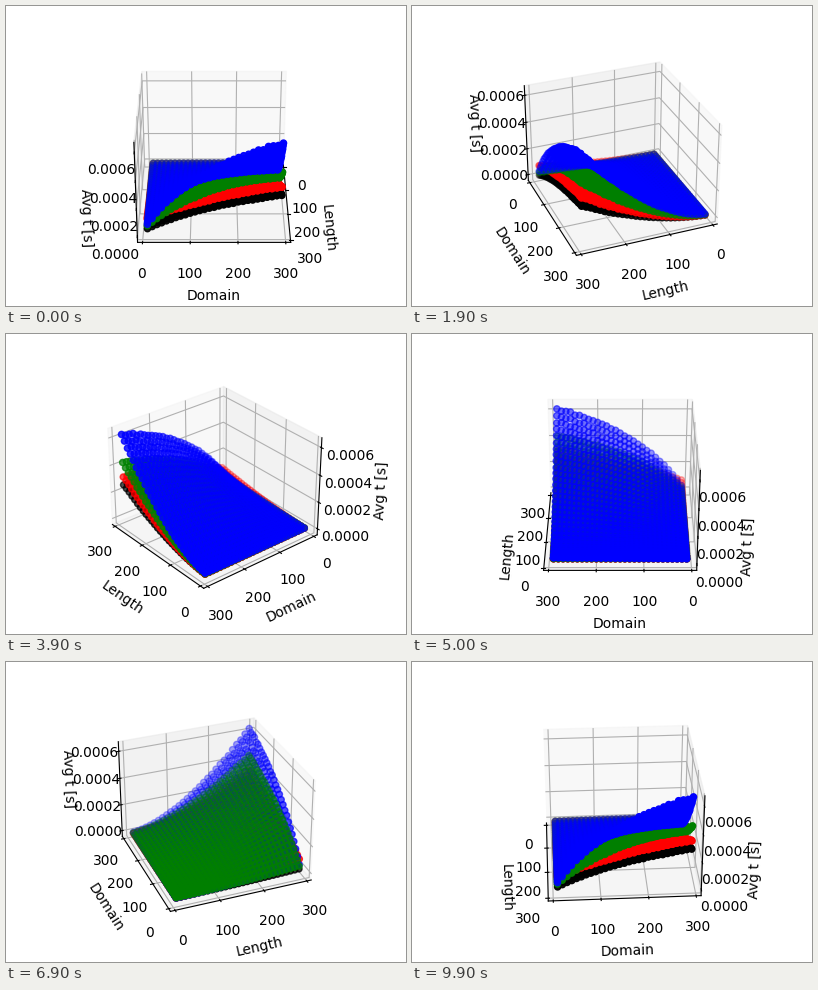
A matplotlib script for the animation above (10 s loop, 400 px wide and 300 px high).

```python
import numpy as np
import matplotlib.pyplot as plt
from matplotlib.animation import FuncAnimation

FRAMES = 100
rng = np.random.default_rng(4)

steps = np.arange(10, 300, 10)
length, domain = (g.ravel() for g in np.meshgrid(steps, steps, indexing="ij"))


def timing(start, slow, bend, power=1.7, noise=0.012):
    """Average time in seconds: convex in length, saturating in domain."""
    t = start + domain / (slow + bend * domain)
    t *= (length / 290) ** power
    return 1e-3 * t * (1 + noise * rng.uniform(-1, 1, t.size))


black = timing(0, 590, 1.78)
red = timing(0.078, 760, 1.45)
green = timing(0.005, 320, 1.27)
blue = timing(0.0, 200, 0.91)

# small fixed overheads
green += 2e-6
blue += 6e-6 * domain / 290

fig = plt.figure(figsize=(4, 3), dpi=100)
ax = fig.add_subplot(projection="3d")
for times, color in ((black, "black"), (red, "red"), (green, "green"), (blue, "blue")):
    ax.scatter(length, domain, times, color=color)

ax.set_xlabel("Length")
ax.set_ylabel("Domain")
ax.set_zlabel("Avg t [s]")
ax.set_zlim(-4.6e-5, 6.7e-4)


def rotate(i):
    # the tiny offset keeps the axis sides stable at right angles
    ax.view_init(elev=30, azim=abs(360 * i / FRAMES - 1e-4))


anim = FuncAnimation(fig, rotate, frames=FRAMES, interval=100, repeat=True)
plt.show()
```
